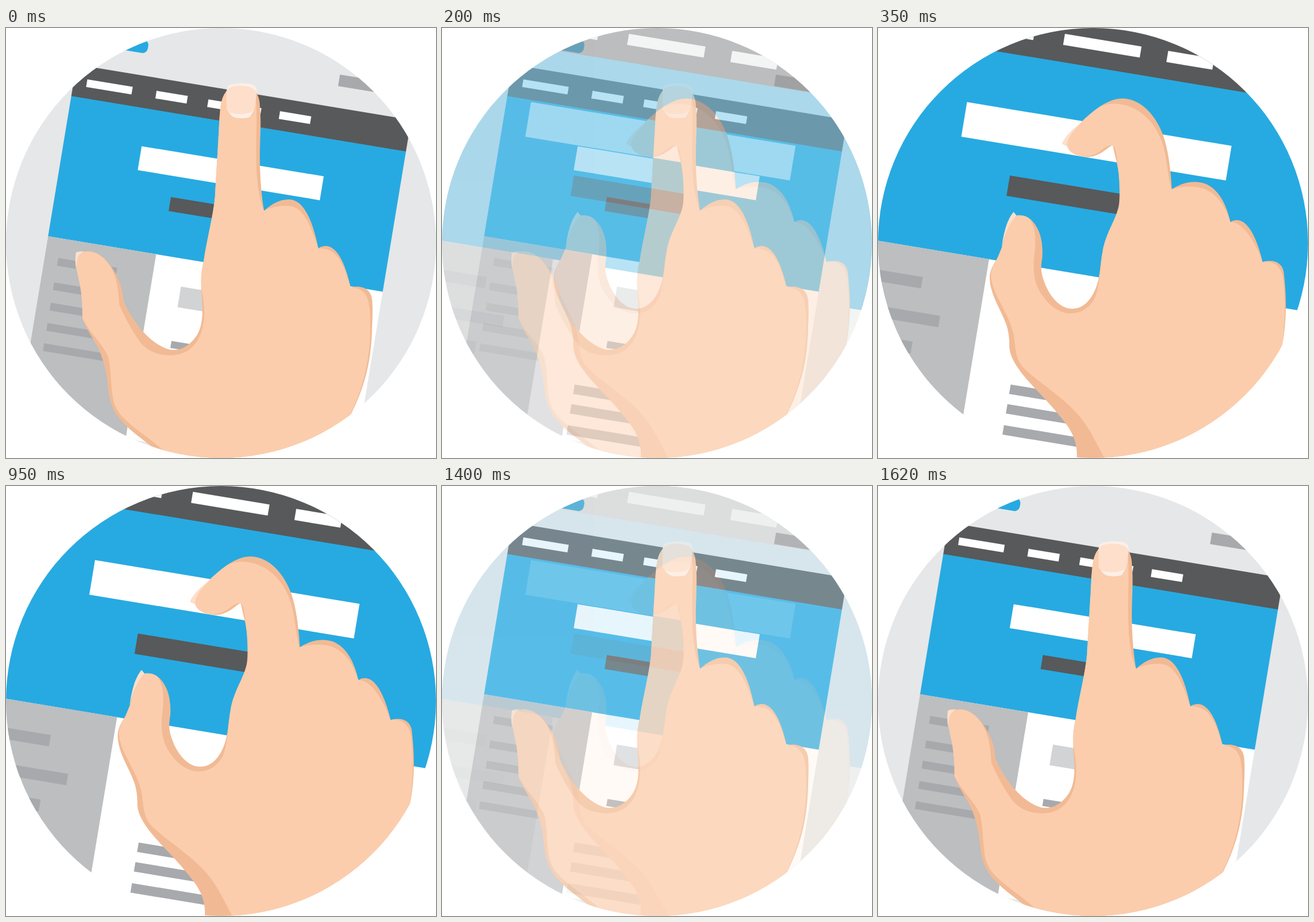
Write an HTML page without scripts that moves like this. It is 720 px wide and 720 px high and loops after 1700 ms.

```html
<!DOCTYPE html>
<html lang="en">
<head>
<meta charset="utf-8">
<title>Pinch to zoom</title>
<style>
  html, body { margin: 0; width: 100%; height: 100%; overflow: hidden; background: #fff; }
  svg { position: absolute; left: 0; top: 0; width: 100%; height: 100%; }
  .near, .far { animation: 1.7s step-end infinite; }
  .far { z-index: 0; animation-name: far; }
  .near { z-index: 1; opacity: 0; animation-name: near; }

  /* The incoming scene always fades in on top of the outgoing one. */
  @keyframes far {
    0% { opacity: 1; z-index: 0; }
    11.76% { opacity: .667; z-index: 0; }
    17.64% { opacity: .333; z-index: 0; }
    20.58% { opacity: 0; z-index: 0; }
    79.41% { opacity: .333; z-index: 2; }
    82.35% { opacity: .667; z-index: 2; }
    88.23%, 100% { opacity: 1; z-index: 2; }
  }
  @keyframes near {
    0% { opacity: 0; }
    11.76% { opacity: .333; }
    17.64% { opacity: .667; }
    20.58% { opacity: 1; }
    79.41% { opacity: .667; }
    82.35% { opacity: .333; }
    88.23%, 100% { opacity: 0; }
  }

  .white { fill: #fff; }
  .blue { fill: #27aae1; }
  .dark { fill: #58595b; }
  .back { fill: #e6e7e8; }
  .side { fill: #bcbec0; }
  .line { fill: #a7a9ac; }
  .pale { fill: #d1d3d4; }
  .skin { fill: #fbcdac; }
  .shade { fill: #f1ba94; }
  .nail { fill: #fddfcb; }
  .rim { fill: #fcefe7; }
</style>
</head>
<body>

<svg class="far" viewBox="0 0 720 720">
  <clipPath id="disc"><circle cx="360" cy="360" r="360"/></clipPath>
  <g clip-path="url(#disc)">
    <rect class="back" width="720" height="720"/>
    <g transform="translate(109.3 114) rotate(9.4)">
      <rect class="blue" y="-113" width="113.5" height="22.5" rx="9"/>
      <rect class="line" x="438" y="-109" width="100" height="19.5"/>
      <rect class="white" y="230" width="568" height="321"/>
      <rect class="dark" y="-53.5" width="568" height="54"/>
      <g class="white">
        <rect x="22" y="-32.1" width="77" height="13"/>
        <rect x="139.5" y="-32.1" width="53" height="13"/>
        <rect x="227.5" y="-32.1" width="90" height="13"/>
        <rect x="349" y="-32.1" width="53" height="13"/>
      </g>
      <rect class="blue" width="568" height="238"/>
      <rect class="white" x="130" y="63.5" width="309" height="40.6"/>
      <rect class="dark" x="192.2" y="139.4" width="120" height="23.8"/>
      <rect class="side" y="238" width="183.5" height="313"/>
      <g class="line">
        <rect x="22.8" y="271" width="100" height="13"/>
        <rect x="22.8" y="312.5" width="100" height="13"/>
        <rect x="22.8" y="347" width="100" height="13"/>
        <rect x="22.8" y="381.5" width="100" height="13"/>
        <rect x="22.8" y="415.8" width="110" height="13"/>
        <rect x="232.5" y="377" width="60" height="12"/>
      </g>
      <rect class="pale" x="233.3" y="284.7" width="75" height="35"/>
    </g>

    <path class="shade" d="M369 106C361 116 359 128 357 160C355 200 352 240 350 282C347 315 336 355 331 390
      C326 415 326 425 328 455C331 490 326 508 314 522C300 538 285 541 272 538C240 528 212 492 197 457
      C195 430 186 414 178 402C166 384 152 373 136 374L118 376C115 395 122 412 125 434C128 455 129 470 128 486
      C136 510 154 528 161 553C173 585 168 610 179 636C190 662 220 682 247 703L300 740H560L577 648
      C600 602 612 560 613 500C614 480 614 465 613 455C611 435 594 431 577 434C569 398 556 366 536 365
      C531 365 527 366 523 369C514 325 500 288 474 287C456 287 444 296 432 306C427 275 425 245 425 215
      C425 185 428 160 425 130C425 118 420 110 418 104Z"/>
    <path class="skin" d="M369 106C361 116 359 128 357 160C355 200 352 240 350 282C347 315 336 355 331 390
      C326 412 326 422 328 440C335 475 332 500 323 519C312 540 295 548 275 548C254 548 236 541 224 525
      C211 507 200 487 190 464C188 435 186 412 168 390C157 378 147 374 136 374L126 376C117 386 117 400 121 418
      C127 440 128 465 128 486C141 512 160 526 171 550C178 580 174 610 183 633C193 658 228 676 262 706
      L300 740H560L576 648C600 600 610 550 610 500C610 480 609 465 606 455C601 439 590 435 577 434
      C565 395 556 368 523 369C510 330 498 300 474 298C460 297 446 299 432 306C422 280 419 250 419 215
      C418 180 422 140 417 108Z"/>
    <path class="rim" d="M369 108C370 100 371 98 374 96C385 92 404 91 415 96C419 98 420 102 420 109L394 120Z"/>
    <path class="nail" d="M370 104C376 94 412 93 419 107C419 118 418 128 414 140C402 147 386 147 372 140
      C368 128 369 115 370 104Z"/>
    <path class="rim" d="M369 128C369 136 371 139 374 141C386 146 402 145 412 140C414 136 416 132 416 128
      C415 140 411 145 408 149C400 152 389 152 381 149C374 145 370 137 369 128Z"/>
    <path class="nail" d="M117 376C121 374 126 374 131 374C121 378 117 388 119 408C115 395 116 384 117 376Z"/>
  </g>
</svg>

<svg class="near" viewBox="0 0 720 720">
  <g clip-path="url(#disc)">
    <rect class="white" width="720" height="720"/>
    <g transform="translate(199 39) rotate(9.4)">
      <rect class="dark" x="-100" y="-150" width="700" height="151"/>
      <g class="white">
        <rect x="-40" y="-47.5" width="97" height="19"/>
        <rect x="107.7" y="-47.5" width="130" height="18.8"/>
        <rect x="283" y="-47.5" width="78" height="19"/>
      </g>
      <rect class="blue" x="-300" width="1000" height="345.5"/>
      <rect class="white" x="-35.4" y="92" width="449" height="58.7"/>
      <rect class="dark" x="55.5" y="201.6" width="210" height="34.5"/>
      <rect class="side" x="-300" y="345.5" width="344" height="400"/>
      <g class="line">
        <rect x="-260" y="393.2" width="199.4" height="19.2"/>
        <rect x="-260" y="452.5" width="238.7" height="19.2"/>
        <rect x="-260" y="502.5" width="200.3" height="20"/>
        <rect x="114" y="546.7" width="150" height="16"/>
        <rect x="114" y="580" width="150" height="16"/>
        <rect x="114" y="615.6" width="150" height="16"/>
      </g>
    </g>

    <path class="shade" d="M316 194C319 178 332 167 343 155C362 137 385 118 410 118C443 119 467 150 478 181
      C486 205 490 235 492 270C508 260 520 257 535 258C566 260 583 292 590 325C594 322 599 321 604 322
      C624 325 638 365 644 392C648 390 653 390 659 390C672 391 680 400 680 415C684 450 685 490 676 535
      L690 740H333V718C334 690 323 671 302 647C282 622 260 602 243 581C231 566 221 550 220 535
      C220 520 219 510 215 497C206 471 187 446 187 417C187 405 195 394 201 383L208 366C212 345 220 324 232 314
      C240 313 248 314 255 320C272 335 277 360 275 385C272 402 273 410 278 424C288 452 306 470 325 470
      C345 470 358 454 366 432C372 415 372 395 376 375C381 345 396 325 402 303C406 290 404 260 403 240
      L393 196C380 203 372 215 350 216C333 214 319 210 316 194Z"/>
    <path class="skin" d="M316 194C319 178 332 167 343 155C354 145 363 137 373 131C388 124 410 126 425 133
      C452 145 470 170 478 199C484 222 486 250 491 270C508 265 520 265 531 266C560 268 580 292 590 325
      C612 323 635 365 644 392C665 388 678 403 679 425C683 460 681 500 676 535L690 740H390L379 720
      C365 694 356 674 340 653C312 618 264 591 242 567C229 552 230 530 227 513C220 477 189 444 189 412
      C190 403 196 394 201 383L208 366C213 348 220 326 232 314C240 313 248 314 253 319C264 332 265 354 262 377
      C259 400 261 420 267 434C281 462 301 477 322 478C342 478 358 466 365 447C372 425 372 397 376 375
      C381 345 396 325 402 303C407 290 405 262 403 244C400 223 400 200 393 197C385 194 377 203 368 209
      C355 216 340 217 327 210C320 206 317 201 316 194Z"/>
    <path class="nail" d="M308 194C314 179 327 169 344 155C332 167 317 181 316 198Z"/>
    <path class="nail" d="M227 308L232 314C220 326 212 348 207 368C210 346 215 322 227 308Z"/>
  </g>
</svg>

</body>
</html>
```
